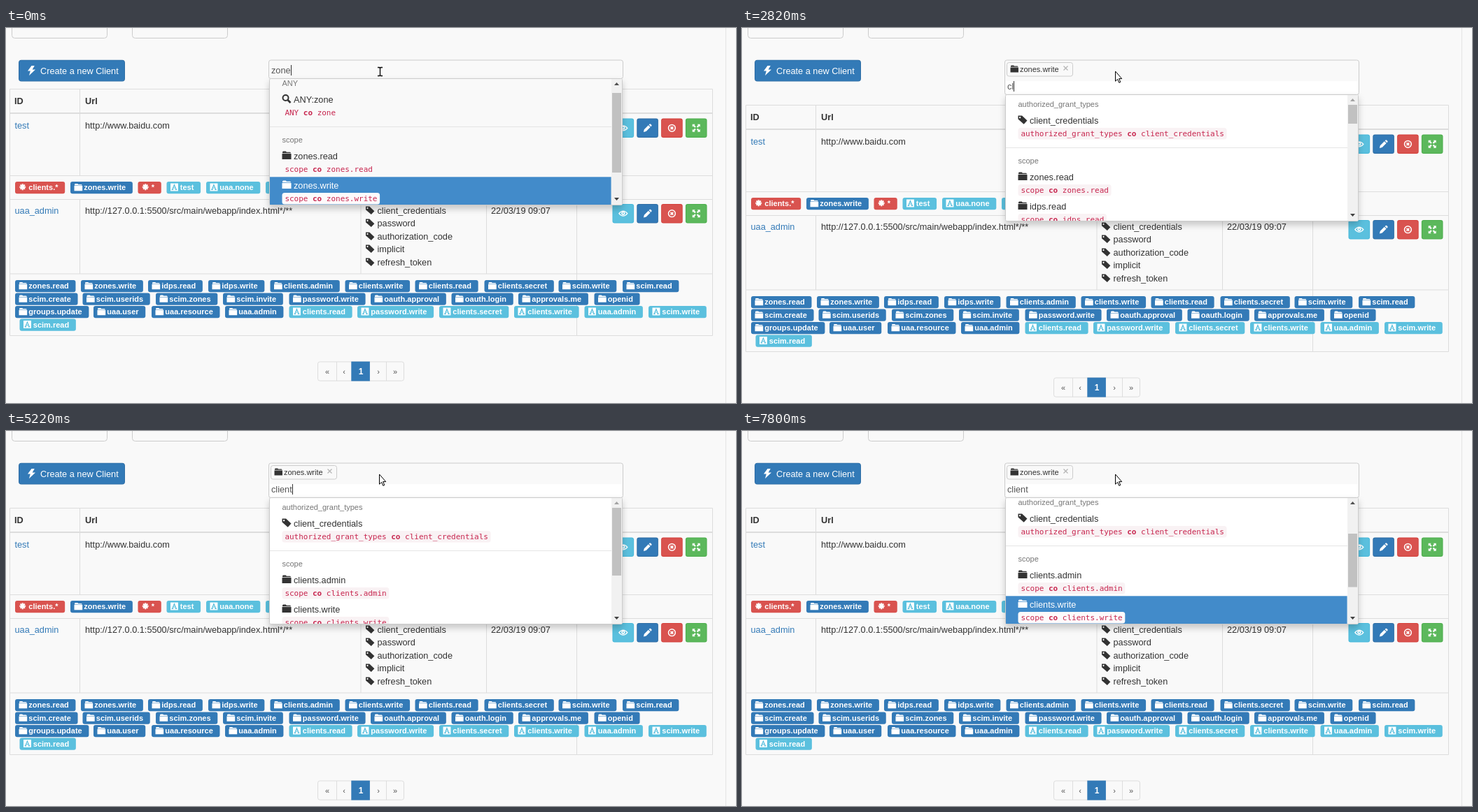
Write an HTML page that moves like this. It is 1043x537 px and loops after 8000 ms.

```html
<!DOCTYPE html>
<html lang="en">
<head>
<meta charset="utf-8">
<title>Client search</title>
<style>
html, body { margin: 0; width: 100%; height: 100%; overflow: hidden; background: #f9f9f9; }
svg { display: block; }
text { font: 12.73px "Liberation Sans", Arial, sans-serif; fill: #333; white-space: pre; }
text.bold { font-weight: bold; }
text.badge { font-size: 11px; font-weight: bold; fill: #fff; }
text.small { font-size: 11px; }
text.code { font: 11px "DejaVu Sans Mono", monospace; letter-spacing: -.02px; fill: #c7254e; }
text.code tspan { font-weight: bold; }
text.page { font-size: 11px; text-anchor: middle; fill: #555; }
text.on { font-size: 12px; fill: #fff; font-weight: bold; }
.line { fill: none; stroke: #ddd; }
.box { fill: none; stroke: #ccc; }
.menu { fill: var(--menu); stroke: #ccc; filter: drop-shadow(0 5px 5px rgba(0, 0, 0, .2)); }
</style>
</head>
<body>
<svg width="1043" height="537" viewBox="0 0 1043 537">
  <defs>
    <g id="folder"><path d="M0 4h13v8H0zM.5 3.2V1.6L1.5.6h3.7l1.2 1.2h5.1l1 1v.4z"/></g>
    <g id="tag"><path fill-rule="evenodd" d="M0 .5h5.6l7.4 7-4.8 5.2L0 5.4zM2.6 1.9a1.2 1.2 0 1 0 .01 0z"/></g>
    <g id="search" fill="none" stroke="currentColor"><circle cx="5" cy="5" r="4" stroke-width="2"/><path d="M8 8l4 4" stroke-width="2.6"/></g>
    <g id="star"><path fill="none" stroke="currentColor" stroke-width="2.2" d="M5.5.8v9.4M.8 5.5h9.4M2.2 2.2l6.6 6.6M8.8 2.2L2.2 8.8"/></g>
    <g id="letter"><rect width="11.5" height="11.5"/><path fill="none" stroke="#5bc0de" stroke-width="1.2" d="M1.7 9.4h2.8M7 9.4h2.8M2.8 9.2L5.7 2.2l3 7M3.8 6.8h3.8"/></g>
    <g id="flash"><path d="M5.5 0L0 7.6h3.8L2 14l9-8.6H6.6L9.8 0z"/></g>
    <g id="eye" fill="none" stroke="currentColor"><path stroke-width="1.3" d="M.5 6.5q6-7 12 0q-6 7-12 0z"/><circle cx="6.5" cy="6" r="1.8" stroke-width="1.6"/></g>
    <g id="pencil"><path d="M.8 12.2l.9-3.7 6-6 2.8 2.8-6 6zM8.5 1.7l1-1q.8-.6 1.6.2l1 1q.8.8.1 1.6l-1 1z"/></g>
    <g id="remove" fill="none" stroke="currentColor"><circle cx="6.5" cy="6.5" r="4.9" stroke-width="1.5"/><path stroke-width="1.8" d="M4.6 4.6l3.8 3.8M8.4 4.6l-3.8 3.8"/></g>
    <g id="resize"><path d="M1 1h4L3.8 2.2 6 4.4 4.4 6 2.2 3.8 1 5zM12 1v4l-1.2-1.2L8.6 6 7 4.4l2.2-2.2L8 1zM12 12H8l1.2-1.2L7 8.6 8.6 7l2.2 2.2L12 8zM1 12V8l1.2 1.2L4.4 7 6 8.6l-2.2 2.2L5 12z"/></g>
  </defs>
  <g id="head"></g>
  <g id="table"></g>
  <g id="live"></g>
</svg>
<script>
const $ = id => document.getElementById(id);
const BLUE = '#337ab7', INFO = '#5bc0de', RED = '#d9534f', GREEN = '#5cb85c', DARK = '#333';
const EDGE = { [BLUE]: '#2e6da4', [INFO]: '#46b8da', [RED]: '#d43f3a', [GREEN]: '#4cae4c' };

const text = (x, y, s, cls = '', fill = '') =>
  `<text x="${x}" y="${y}" class="${cls}"${fill && ` style="fill:${fill}"`}>${s}</text>`;
const rect = (x, y, w, h, fill, r = 0) =>
  `<rect x="${x}" y="${y}" width="${w}" height="${h}" rx="${r}" fill="${fill}"/>`;
const frame = (x, y, w, h, r, cls = 'box') =>
  `<rect x="${x}" y="${y}" width="${w}" height="${h}" rx="${r}" class="${cls}"/>`;
const icon = (id, x, y, color = '#fff', scale = 1) =>
  `<use href="#${id}" transform="translate(${x} ${y}) scale(${scale})" fill="${color}" color="${color}"/>`;
const path = (d, attrs) => `<path d="${d}" ${attrs}/>`;
const button = (x, y, w, h, color, r) =>
  rect(x, y, w, h, EDGE[color], r) + rect(x + .9, y + .9, w - 1.8, h - 1.8, color, r - .9);

const pen = document.createElement('canvas').getContext('2d');
function width(s, font) {
  pen.font = font + ' "Liberation Sans", Arial, sans-serif';
  return pen.measureText(s).width;
}

function badge(x, y, s, color) {
  const id = { [BLUE]: 'folder', [INFO]: 'letter', [RED]: 'star' }[color];
  return rect(x, y - 12, width(s, 'bold 11px') + 29, 17.3, color, 3) +
    icon(id, x + 5.5, y - 9.5, '#fff', id === 'folder' ? .9 : .95) +
    text(x + 19.3, y, s, 'badge');
}

// each entry is "x name"; a trailing ! marks the light colour
const badges = (y, list) => list.split(', ').map(item => {
  const [x, name] = item.split(' ');
  return badge(+x, y, name.replace('!', ''), name.endsWith('!') ? INFO : BLUE);
}).join('');

function actions(y) {
  return [['eye', INFO], ['pencil', BLUE], ['remove', RED], ['resize', GREEN]].map(([id, color], i) => {
    const x = 866.5 + i * 34.8;
    return button(x, y, 30.6, 27.4, color, 3) + icon(id, x + 8.8, y + 7.2);
  }).join('');
}

function pager() {
  const edges = [445.5, 472.5, 493.5, 520.5, 543.5, 568.5], y = 478, h = 27.2;
  let out = frame(445.5, y, 123, h, 3, 'line');
  out += path(`M472.5 ${y}v${h}M543.5 ${y}v${h}`, 'class="line"') + rect(493.3, y - .4, 26.6, h + .8, BLUE);
  ['«', '‹', '1', '›', '»'].forEach((s, i) => {
    out += text((edges[i] + edges[i + 1]) / 2, 495.5, s, s === '1' ? 'page on' : 'page');
  });
  return out;
}

function drawStatic() {
  $('head').innerHTML =
    frame(8.5, -20.5, 136, 35, 4) + frame(180.5, -20.5, 136, 35, 4) +
    path('M1028.5 0V537', 'stroke="#e4e4e4"') +
    button(18, 45.7, 152, 30.9, BLUE, 4) + icon('flash', 31, 54) +
    text(49, 66, 'Create a new Client', '', '#fff');

  const grants = ['client_credentials', 'password', 'authorization_code', 'implicit', 'refresh_token'];
  $('table').innerHTML =
    path('M5.5 87.5H1009.5V440.5H5.5zM5.5 211.5H1009.5M5.5 245.5H1009.5M5.5 352H1009.5' +
      'M105.5 87.5V211.5M105.5 245.5V352M507 87.5V211.5M507 245.5V352' +
      'M686.5 87.5V211.5M686.5 245.5V352M815.5 87.5V440.5', 'class="line"') +
    path('M5 122H1010', 'class="line" stroke-width="2"') +
    text(12, 109, 'ID', 'bold') + text(113, 109, 'Url', 'bold') +
    text(12.5, 144, 'test', '', BLUE) + text(113, 144, 'http://www.baidu.com') +
    actions(129.6) +
    badge(13, 232, 'clients.*', RED) + badge(188.5, 232, '*', RED) +
    badges(232, '92 zones.write, 229.5 test!, 286 uaa.none!, 371 uaa.user!') +
    text(12.5, 266, 'uaa_admin', '', BLUE) +
    text(113, 266, 'http://127.0.0.1:5500/src/main/webapp/index.html*/**') +
    grants.map((s, i) => {
      const y = Math.round(266 + i * 18.4);
      return icon('tag', 514, y - 11, DARK, .95) + text(530.5, y, s);
    }).join('') +
    text(693, 266, '22/03/19 09:07') + actions(252) +
    badges(373, '13 zones.read, 107 zones.write, 203 idps.read, 289 idps.write, 377.5 clients.admin, 484.5 clients.write, 584.5 clients.read, 683.5 clients.secret, 789.5 scim.write, 881 scim.read') +
    badges(391.5, '13 scim.create, 109.5 scim.userids, 214 scim.zones, 310 scim.invite, 404.5 password.write, 521 oauth.approval, 636.5 oauth.login, 732 approvals.me, 840.5 openid') +
    badges(410, '13 groups.update, 125 uaa.user, 208 uaa.resource, 313 uaa.admin, 404.5 clients.read!, 502 password.write!, 619 clients.secret!, 726 clients.write!, 826.5 uaa.admin!, 918 scim.write!') +
    badges(428.5, '19.5 scim.read!') +
    pager();
}

const GRANT = 'authorized_grant_types';
const any = q => ['ANY', [q]];
const matches = [[GRANT, ['client_credentials']], ['scope', ['clients.admin', 'clients.write']]];
const ICONS = { ANY: 'search', scope: 'folder', [GRANT]: 'tag' };

// menu contents: groups, active item, scroll offset, thumb start and length
const first = { groups: [any('zone'), ['scope', ['zones.read', 'zones.write']]], active: 2, scroll: 7, thumb: [21, 114] };
const all = q => ({ groups: [any(q), [GRANT, ['client_credentials', 'implicit']]], active: 0, scroll: 7, thumb: [16, 18] });
const wide = { groups: [matches[0], ['scope', ['zones.read', 'idps.read']]], active: -1, scroll: 0, thumb: [15, 27] };
const bare = { groups: matches, active: -1, scroll: 0, thumb: [15, 97] };
const found = (q, active = 0, scroll = 0) =>
  ({ groups: [any(q), ...matches], active, scroll, thumb: [15 + Math.round(scroll * .42), 76.5] });

// time, typed text, caret shown, menu
const steps = [
  [0, 'zone', 1, first],
  [410, 'zone', 0, first],
  [810, '', 1, all('zone')],
  [1340, '', 0, all('zone')],
  [1740, '', 1, all('zone')],
  [2430, '', 0, all('zone')],
  [2680, 'c', 1, all('c')],
  [2820, 'cl', 1, wide],
  [2950, 'cl', 1, found('cl')],
  [3380, 'cl', 0, found('cl')],
  [3930, 'cli', 1, bare],
  [4060, 'cli', 1, found('cli')],
  [4470, 'cli', 0, found('cli')],
  [4770, 'clie', 1, bare],
  [4930, 'clien', 1, bare],
  [5080, 'clien', 1, found('clien')],
  [5220, 'client', 1, bare],
  [5350, 'client', 1, found('client')],
  [5780, 'client', 0, found('client')],
  [6180, 'client', 0, found('client', 1)],
  [6310, 'client', 1, found('client', 1)],
  [6850, 'client', 0, found('client', 2, 46)],
  [7010, 'client', 0, found('client', 3, 88)],
  [7270, 'client', 1, found('client', 3, 88)],
  [7800, 'client', 0, found('client', 3, 88)],
];
const LOOP = 8000, PICKED = 810, BRIGHT = 2820;

function items({ groups, active, scroll }, top, tint) {
  let y = top + 25 - scroll, n = 0, out = '';
  groups.forEach(([key, values], g) => {
    if (g) {
      out += path(`M377 ${y + 9.5}H865`, 'stroke="#e5e5e5"');
      y += 39;
    }
    out += text(394.5, y - 7, key, 'small', '#777');
    for (const value of values) {
      const on = n++ === active, ink = on ? '#fff' : DARK;
      if (on) out += rect(377, y + .3, 487.6, 41.8, '#428bca');
      out += icon(ICONS[key], 394.5, y + 5, ink) +
        text(411, y + 17, key === 'ANY' ? 'ANY:' + value : value, '', ink) +
        rect(394.5, y + 23, (key + value).length * 6.6 + 34, 16.5, on ? '#fdfafb' : tint, 3.5) +
        text(398.4, y + 35, `${key} <tspan>co</tspan> ${value}`, 'code');
      y += 42;
    }
  });
  return out;
}

function scrollbar({ scroll, thumb: [start, size] }, top) {
  return rect(865, top + 1, 15, 180, '#f1f1f1') +
    rect(866, top + start, 13, size, '#c1c1c1') +
    path(`M869 ${top + 10}h7l-3.5-4z`, `fill="${scroll ? '#505050' : '#a3a3a3'}"`) +
    path(`M869 ${top + 171}h7l-3.5 4z`, 'fill="#404040"');
}

function draw([time, typed, caret, menu]) {
  const picked = time >= PICKED, bright = time >= BRIGHT;
  const shift = picked ? 23 : 0, top = 72 + shift;
  const end = Math.round(379.3 + width(typed, '12.73px'));
  $('table').setAttribute('transform', `translate(0 ${shift})`);
  $('live').style.setProperty('--menu', bright ? '#fff' : '#f9f9f9');

  let out = frame(375.5, 46, 506, 26.5 + shift, 3);
  if (bright) out += rect(377, 76, 503, 18, '#fff');
  if (picked) {
    out += frame(378.5, 49.5, 94, 19.5, 3) + icon('folder', 383.5, 53, DARK, .88) +
      text(397, 63, 'zones.write', 'small') +
      path('M459.5 54.5l6 6M465.5 54.5l-6 6', 'stroke="#b5b5b5" stroke-width="1.3"');
  }
  out += text(379, 65 + shift, typed, '', '#555');
  if (caret) out += rect(end, 53 + shift, 1, 15, '#333');

  out += frame(376.5, top + .5, 504, 181, 2, 'menu') +
    `<clipPath id="view">${rect(377, top + 1, 503, 180, '#000')}</clipPath>` +
    `<g clip-path="url(#view)">${items(menu, top, bright ? '#f9f2f4' : 'none')}${scrollbar(menu, top)}</g>`;

  out += picked
    ? path('M533.5 62v14.2l3.1-2.9 2.2 5 2-.9-2.2-4.8h4.1z', 'fill="#fff" stroke="#000"')
    : path('M531 56.5h2.5l1 1 1-1H538M534.5 57v11M531 68.5h2.5l1-1 1 1H538', 'fill="none" stroke="#000" stroke-width="1.3"');
  $('live').innerHTML = out;
}

drawStatic();
const born = performance.now();
let shown = null;
function tick() {
  const t = (performance.now() - born) % LOOP;
  const step = steps.findLast(s => s[0] <= t);
  if (step !== shown) draw(shown = step);
  requestAnimationFrame(tick);
}
tick();
</script>
</body>
</html>
```
